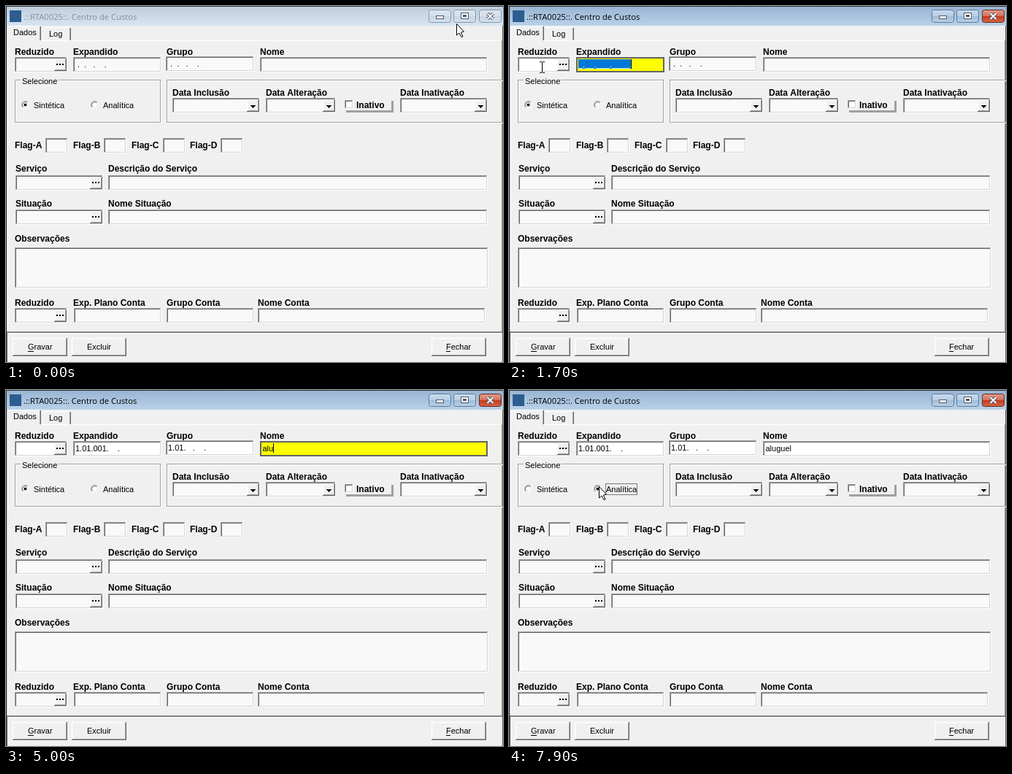
Write an HTML page with a canvas that moves like this. It is 681 px wide and 488 px high and loops after 8000 ms.

```html
<!DOCTYPE html>
<html lang="pt-BR">
<head>
<meta charset="utf-8">
<title>Centro de Custos</title>
<style>
html, body { margin: 0; width: 100%; height: 100%; overflow: hidden; background: #f0f0f0; }
canvas { display: block; }
</style>
</head>
<body>
<canvas id="stage" width="681" height="488"></canvas>
<script>
const ctx = document.getElementById('stage').getContext('2d');
const LOOP = 8000;
const PLAIN = '11px "Liberation Sans", Arial, sans-serif';
const BOLD = 'bold 12px "Liberation Sans", Arial, sans-serif';
const TITLE = '11.2px "Open Sans", "Noto Sans", sans-serif';
const MASK = '#.##.###.####.';
const CODE = '101001', NAME = 'aluguel';
const CODE_KEYS = [2300, 2700, 3000, 3300, 3400, 3600];
const NAME_KEYS = [4700, 4800, 5000, 5400, 5500, 5600, 6000];
const YELLOW = '#ffff00', FACE = '#f0f0f0', IDLE = '#f9f9f9';

function box(x, y, w, h, color) {
  ctx.fillStyle = color;
  ctx.fillRect(x, y, w, h);
}

function text(str, x, y, font = PLAIN, color = '#000') {
  ctx.font = font;
  ctx.fillStyle = color;
  ctx.fillText(str, x, y);
}

function width(str) {
  ctx.font = PLAIN;
  return ctx.measureText(str).width;
}

function poly(points, fill, stroke) {
  ctx.beginPath();
  points.forEach(([x, y]) => ctx.lineTo(x, y));
  ctx.closePath();
  ctx.fillStyle = fill;
  ctx.fill();
  ctx.strokeStyle = stroke;
  ctx.lineWidth = 1;
  ctx.stroke();
}

// One-pixel frame: one colour at top-left, another at bottom-right
function edge(x, y, w, h, topLeft, bottomRight) {
  box(x, y, w, 1, topLeft);
  box(x, y, 1, h, topLeft);
  box(x, y + h - 1, w, 1, bottomRight);
  box(x + w - 1, y, 1, h, bottomRight);
}

function raised(x, y, w, h) {
  box(x, y, w, h, FACE);
  edge(x, y, w, h, '#ffffff', '#696969');
  edge(x + 1, y + 1, w - 2, h - 2, '#f4f4f4', '#a0a0a0');
}

function field(x, y, w, h, fill = IDLE) {
  box(x, y, w, h, fill);
  edge(x, y, w, h, '#a0a0a0', '#ffffff');
  edge(x + 1, y + 1, w - 2, h - 2, '#696969', '#d4d4d4');
}

function focused(x, y, w, h) {
  box(x, y, w, h, '#646464');
  box(x + 2, y + 2, w - 4, h - 4, YELLOW);
}

function caret(x) {
  box(x, 73, 1, 13, '#000');
}

function dots(x, y) {
  raised(x, y, 17, 17);
  for (let i = 0; i < 3; i++) box(x + 3 + i * 4, y + 7, 2, 2, '#000');
}

function lookup(x, y, w, fill) {
  field(x, y, w, 21, fill);
  dots(x + w - 18, y + 2);
}

function combo(x, y, w) {
  field(x, y, w, 21);
  raised(x + w - 18, y + 2, 17, 17);
  for (let i = 0; i < 4; i++) box(x + w - 13 + i, y + 10 + i, 7 - 2 * i, 1, '#000');
}

function etched(x, y, w, h) {
  ctx.lineWidth = 1;
  ctx.strokeStyle = '#ffffff';
  ctx.strokeRect(x + 1.5, y + 1.5, w, h);
  ctx.strokeStyle = '#a0a0a0';
  ctx.strokeRect(x + .5, y + .5, w, h);
}

function radio(x, y, on) {
  const arc = (r, a, b, color) => {
    ctx.beginPath();
    ctx.arc(x, y, r, a, b);
    ctx.strokeStyle = color;
    ctx.lineWidth = 1;
    ctx.stroke();
  };
  const disc = (r, color) => {
    ctx.beginPath();
    ctx.arc(x, y, r, 0, 7);
    ctx.fillStyle = color;
    ctx.fill();
  };
  const a = Math.PI * .75, b = Math.PI * 1.75;
  disc(5, '#fff');
  arc(5, a, b, '#a0a0a0');
  arc(4, a, b, '#696969');
  arc(5, b, a, '#ffffff');
  arc(4, b, a, '#dedede');
  if (on) disc(2, '#000');
}

function focusRect(x, y, w, h) {
  ctx.save();
  ctx.setLineDash([1, 1]);
  ctx.strokeStyle = '#000';
  ctx.lineWidth = 1;
  ctx.strokeRect(x + .5, y + .5, w - 1, h - 1);
  ctx.restore();
}

function button(label, x, tx, underline) {
  raised(x, 455, 75, 25);
  text(label, tx, 471);
  if (underline) box(tx, 473, underline, 1, '#000');
}

function titleButton(x, active, close) {
  const red = close && active;
  const grad = ctx.createLinearGradient(0, 5, 0, 23);
  const tones = red ? ['#e8a090', '#d5705a', '#c03a1e', '#d9694a']
    : active ? ['#c9dcee', '#b7cee6', '#a0bcd8', '#b9d2ea']
    : ['#dbe6f1', '#d3e0ed', '#c6d5e4', '#d5e2f0'];
  [0, .48, .5, 1].forEach((p, i) => grad.addColorStop(p, tones[i]));
  ctx.beginPath();
  ctx.roundRect(x + .5, 5.5, 30, 17, 3);
  ctx.fillStyle = grad;
  ctx.fill();
  ctx.strokeStyle = red ? '#5c2a22' : active ? '#5f7a97' : '#8796a8';
  ctx.lineWidth = 1;
  ctx.stroke();
}

function glyphBox(x, y, w, h) {
  box(x, y, w, h, '#535666');
  box(x + 1, y + 1, w - 2, h - 2, '#fff');
}

function cross(color, size) {
  ctx.strokeStyle = color;
  ctx.lineWidth = size;
  ctx.beginPath();
  ctx.moveTo(659.5, 10); ctx.lineTo(667.5, 18);
  ctx.moveTo(667.5, 10); ctx.lineTo(659.5, 18);
  ctx.stroke();
}

function titleBar(active) {
  const grad = ctx.createLinearGradient(0, 0, 0, 27);
  grad.addColorStop(0, active ? '#98b4d2' : '#bfcddb');
  grad.addColorStop(1, active ? '#b9d1ea' : '#d7e4f2');
  box(0, 0, 681, 27, grad);
  box(1, 27, 1, 419, active ? '#b9d1ea' : '#d7e4f2');
  box(0, 0, 681, 1, '#30353c');
  box(0, 0, 1, 488, '#30353c');
  box(5, 6, 16, 16, '#2d5c8f');
  text('.::RTA0025::. Centro de Custos', 24, 19, TITLE, active ? '#000' : '#838c96');
  titleButton(579, active);
  titleButton(613, active);
  titleButton(648, active, true);
  glyphBox(589, 13, 11, 5);
  glyphBox(623, 9, 11, 9);
  box(626, 12, 5, 3, '#535666');
  cross('#535666', 4);
  cross('#fff', 2);
}

function tabs() {
  box(0, 27, 681, 461, FACE);
  box(2, 47, 677, 1, '#fff');
  box(2, 28, 1, 417, '#fff');
  box(3, 27, 44, 1, '#fff');
  box(3, 47, 45, 1, FACE);
  box(47, 28, 1, 19, '#696969');
  box(46, 28, 1, 19, '#a0a0a0');
  box(49, 29, 38, 1, '#fff');
  box(88, 30, 1, 17, '#696969');
  box(87, 30, 1, 17, '#a0a0a0');
  text('Dados', 10, 40);
  text('Log', 59, 42);
  box(679, 47, 1, 400, '#a0a0a0');
  box(680, 27, 1, 461, '#696969');
  box(1, 446, 679, 1, '#a0a0a0');
  box(1, 447, 679, 1, '#696969');
  box(1, 448, 1, 40, '#696969');
  box(2, 448, 677, 1, '#fff');
}

function labels() {
  const rows = [
    [67, 'Reduzido', 12, 'Expandido', 92, 'Grupo', 220, 'Nome', 348],
    [123, 'Data Inclusão', 228, 'Data Alteração', 356, 'Data Inativação', 540],
    [195, 'Flag-A', 12, 'Flag-B', 92, 'Flag-C', 172, 'Flag-D', 252],
    [227, 'Serviço', 13, 'Descrição do Serviço', 140],
    [275, 'Situação', 13, 'Nome Situação', 140],
    [323, 'Observações', 12],
    [411, 'Reduzido', 12, 'Exp. Plano Conta', 92, 'Grupo Conta', 220, 'Nome Conta', 345]
  ];
  for (const [y, ...parts] of rows)
    for (let i = 0; i < parts.length; i += 2) text(parts[i], parts[i + 1], y, BOLD);
}

function staticForm() {
  etched(12, 101, 199, 58);
  box(20, 99, 51, 6, FACE);
  text('Selecione', 22, 107);
  etched(220, 101, 470, 58);
  combo(228, 126, 120);
  combo(356, 126, 96);
  combo(540, 126, 120);
  box(466, 143, 65, 3, '#a0a0a0');
  box(528, 130, 3, 16, '#a0a0a0');
  box(463, 127, 65, 16, FACE);
  field(464, 129, 12, 12, '#fff');
  text('Inativo', 480, 140, BOLD);
  [54, 134, 215, 294].forEach(x => field(x, 181, 31, 21));
  [232, 279].forEach(y => {
    lookup(13, y, 120);
    field(140, y, 520, 21);
  });
  field(12, 331, 649, 56);
  lookup(12, 414, 72);
  field(93, 414, 120, 21);
  field(220, 414, 120, 21);
  field(345, 414, 312, 21);
  button('Gravar', 9, 30, 8);
  button('Excluir', 90, 111);
  button('Fechar', 583, 603, 6);
}

function masked(digits, blank) {
  let i = 0;
  return MASK.replace(/#/g, () => digits[i++] || blank);
}

function selected(str, x, from, to) {
  const left = Math.round(x + width(str.slice(0, from)));
  const right = Math.min(167, Math.round(x + width(str.slice(0, to))));
  ctx.save();
  ctx.beginPath();
  ctx.rect(left, 73, right - left, 13);
  ctx.clip();
  box(left, 73, right - left, 13, '#0078d7');
  text(str, x, 84, PLAIN, '#fff');
  ctx.restore();
}

function codeField(t) {
  const active = t >= 1700 && t < 3900;
  const count = CODE_KEYS.filter(k => t >= k).length;
  const str = masked(CODE.slice(0, count), active ? '_' : ' ');
  if (active) focused(92, 70, 121, 21);
  else field(92, 70, 121, 21, t >= 3900 ? '#fff' : IDLE);
  text(str, 95, 84);
  if (!active) return;
  if (!count) {
    selected(str, 95, 0, str.length);
    if (t < 2100) caret(167);
  } else {
    const at = str.indexOf('_');
    selected(str, 95, at, at + 1);
  }
}

function nameField(t) {
  const active = t >= 3900 && t < 6200;
  const str = NAME.slice(0, NAME_KEYS.filter(k => t >= k).length);
  if (active) focused(348, 70, 312, 21);
  else field(348, 70, 312, 21, t >= 6200 ? '#fff' : IDLE);
  text(str, 351.5, 84);
  if (active && (t < 4400 || t >= 4700)) caret(Math.round(351 + width(str)));
}

function topRow(t) {
  if (t >= 800 && t < 1700) {
    focused(12, 70, 73, 21);
    dots(66, 72);
    if (t < 1300) caret(15);
  } else {
    lookup(12, 70, 72, t >= 1700 ? '#fff' : IDLE);
  }
  codeField(t);
  field(219, 69, 121, 21, t >= 3900 ? '#fff' : IDLE);
  text(masked(t >= 3900 ? CODE.slice(0, 3) : '', ' '), 222, 83);
  nameField(t);
}

function options(t) {
  const second = t >= 7900;
  radio(26.5, 135.5, !second);
  radio(121.5, 135.5, second);
  text('Sintética', 38, 140);
  text('Analítica', 133, 140);
  if (second) focusRect(132, 128, 44, 16);
  else if (t >= 6200) focusRect(37, 128, 43, 16);
}

function arrow(x, y) {
  const shape = [[0, 0], [0, 15.5], [3.5, 12.5], [6.5, 18], [8.5, 17.5], [6, 11.5], [10, 10.5]];
  poly(shape.map(([a, b]) => [x + a + .5, y + b + .5]), '#fff', '#000');
}

function beam(x, y, color = '#000') {
  box(x, y - 7, 1, 14, color);
  [y - 8, y + 7].forEach(row => {
    box(x - 3, row, 3, 1, color);
    box(x + 1, row, 3, 1, color);
  });
}

function pointer(t) {
  const path = [[617, 24], [560, 46], [405, 82], [225, 96], [85, 93]];
  const step = Math.floor(t / 100);
  if (step < path.length) arrow(...path[step]);
  else if (t < 600) beam(21, 86);
  else if (t < 4700) beam(45, 84, t >= 800 && t < 1700 ? '#0000ff' : '#000');
  else if (t >= 6800 && t < 6900) beam(46, 84);
  else if (t >= 7100) {
    const k = Math.min(1, (step - 71) / 6);
    arrow(Math.round(103 + 20 * (1 - (1 - k) ** 2)), 132);
  }
}

function draw(now) {
  const t = now % LOOP;
  tabs();
  titleBar(t >= 800);
  labels();
  staticForm();
  topRow(t);
  options(t);
  pointer(t);
}

let start;
function tick(now) {
  start ??= now;
  draw(now - start);
  requestAnimationFrame(tick);
}
draw(0);
requestAnimationFrame(tick);
</script>
</body>
</html>
```
